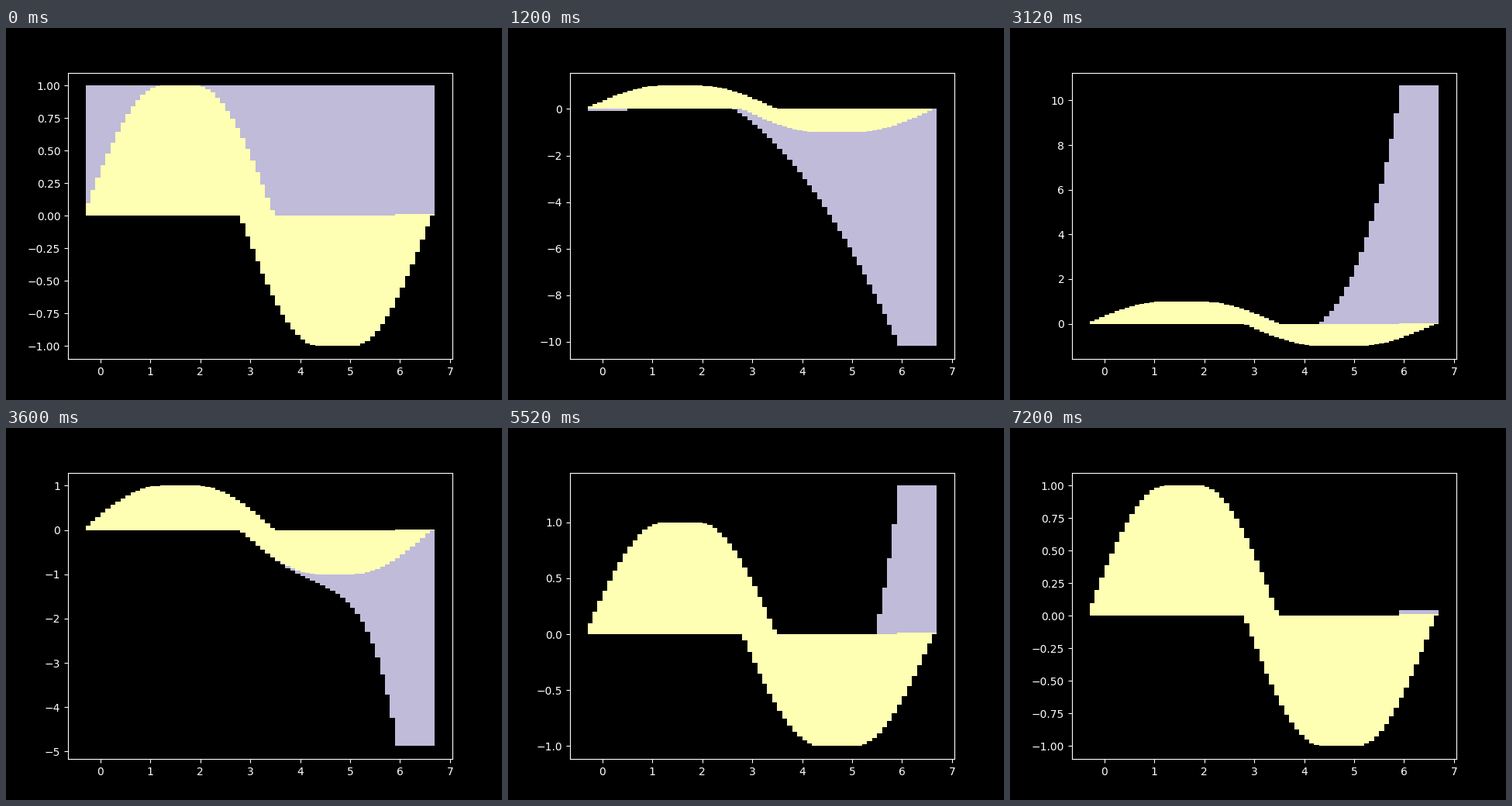
A matplotlib script for the animation above (8 s loop, 640 by 480 pixels).

```python
"""Taylor expansion of sin(x) around pi/2, one more non-zero term per step."""
from math import factorial

import matplotlib.pyplot as plt
import numpy as np
from matplotlib.animation import FuncAnimation

INTERVAL = 400          # ms per frame
FRAMES = 20
FRAMES_PER_STEP = 3
CENTER = np.pi / 2

SINE_COLOR = "#feffb3"
TAYLOR_COLOR = "#bfbbd9"

plt.style.use("dark_background")
fig, ax = plt.subplots(figsize=(6.4, 4.8), dpi=100)
x = 0.1 * np.arange(1, 64)


def taylor(x, order):
    """Even-power expansion of sin around pi/2; the odd terms vanish there."""
    u = x - CENTER
    return sum((-1) ** k * u ** (2 * k) / factorial(2 * k)
               for k in range(order + 1))


def draw(frame):
    ax.clear()
    ax.bar(x, taylor(x, frame // FRAMES_PER_STEP), color=TAYLOR_COLOR)
    ax.bar(x, np.sin(x), color=SINE_COLOR)
    return []


anim = FuncAnimation(fig, draw, frames=FRAMES, interval=INTERVAL,
                     init_func=lambda: draw(0), repeat=True, repeat_delay=0)
plt.show()
```
